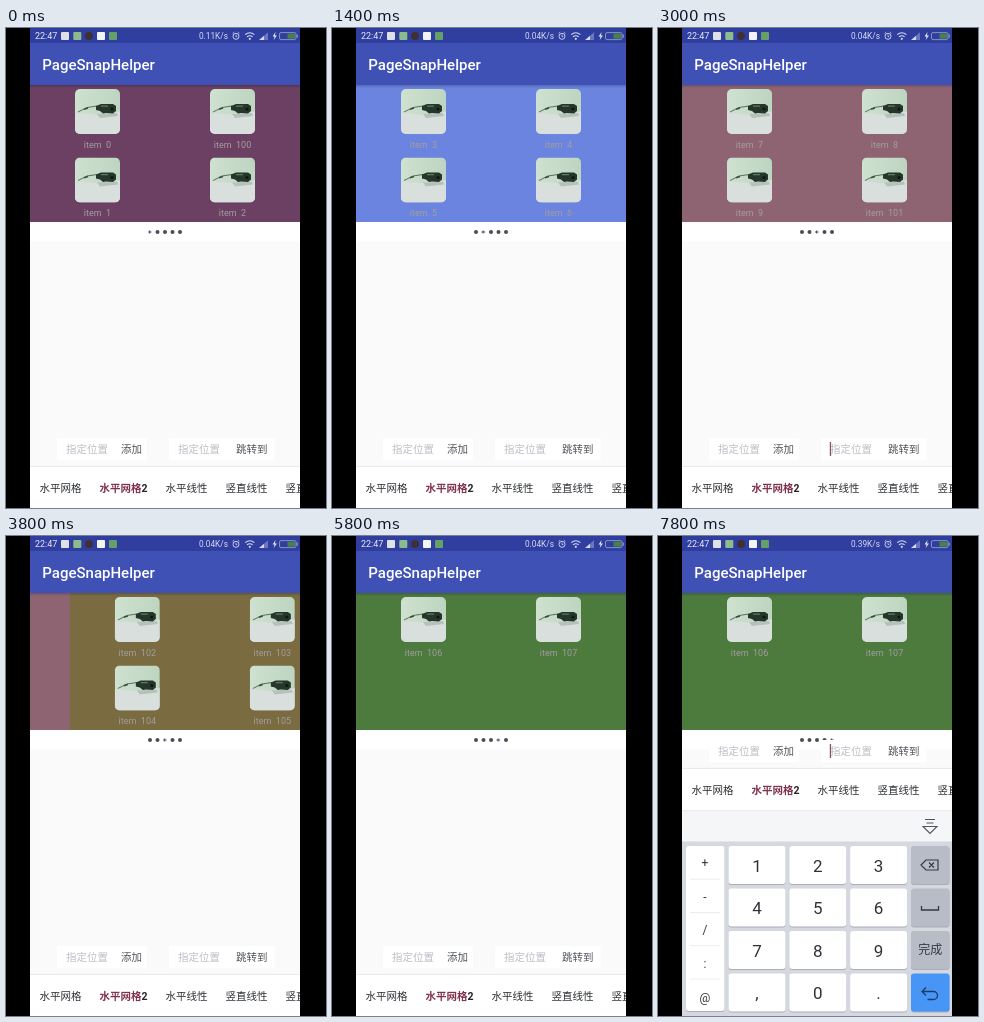
Write an HTML page that moves like this. It is 320x480 px and loops after 8000 ms.

```html
<!DOCTYPE html>
<html lang="zh">
<head>
<meta charset="utf-8">
<title>PageSnapHelper</title>
<style>
html, body { margin: 0; width: 100%; height: 100%; overflow: hidden; background: #000; }
svg { display: block; width: 100%; height: 100%; }
text { font-family: Roboto, "Noto Sans CJK SC", "Noto Sans CJK", sans-serif; white-space: pre; }
</style>
</head>
<body>
<svg id="stage" viewBox="0 0 320 480"></svg>
<script>
const LOOP = 8000, PAGE = 270, LEFT = 24;
const SWIPES = [199, 1688, 3185, 4660], SWIPE_TIME = 1000, IDLE_DELAY = 1150;
const KEYS_UP = 6700, KEYS_TIME = 300, PANEL_LIFT = 206;
const PAGES = [
  ['#6c4062', [0, 100, 1, 2]],
  ['#6b84df', [3, 4, 5, 6]],
  ['#8e6473', [7, 8, 9, 101]],
  ['#7a6b41', [102, 103, 104, 105]],
  ['#4d7a3d', [106, 107]]
];

const rect = (x, y, w, h, fill, r = 0, more = '') =>
  `<rect x="${x}" y="${y}" width="${w}" height="${h}" rx="${r}" fill="${fill}" ${more}/>`;
const text = (x, y, size, fill, str, more = '') =>
  `<text x="${x}" y="${y}" font-size="${size}" fill="${fill}" ${more}>${str}</text>`;
const mid = (x, y, size, fill, str) => text(x, y, size, fill, str, 'text-anchor="middle"');
const line = (d, stroke, w = 1, more = '') =>
  `<path d="${d}" fill="none" stroke="${stroke}" stroke-width="${w}" ${more}/>`;
const disc = (x, y, r, fill) => `<circle cx="${x}" cy="${y}" r="${r}" fill="${fill}"/>`;

function statusBar() {
  return rect(LEFT, 0, PAGE, 15, '#303f9f') +
    text(29, 11.3, 9, '#e8eaf6', '22:47') +
    rect(55, 4, 8, 8, '#dfe1e4', 1) +
    rect(67.3, 4, 8, 8, '#8dbb8c', 1) +
    disc(83, 8, 4, '#3f3034') +
    rect(91, 4, 8, 8, '#f2f4fa', 1) +
    rect(103, 4, 8, 8, '#65a067', 1) +
    text(222, 11, 8.3, '#d5daf0', '', 'id="speed" text-anchor="end"') +
    '<circle cx="230" cy="8.3" r="3" fill="none" stroke="#d5daf0" stroke-width=".9"/>' +
    line('M230 6.6v2h1.3M226.6 5.6l1.6-1.5M233.4 5.6l-1.6-1.5', '#d5daf0', .8) +
    line('M239.2 6.7q4.6-3.8 9.2 0M241 8.8q2.8-2.2 5.6 0', '#d5daf0', 1.1) +
    disc(243.8, 10.8, 1.1, '#d5daf0') +
    '<path d="M253 12l5-4.2V12z" fill="#d5daf0"/>' +
    '<path d="M258 12V7.8l4-3.5V12z" fill="#6a76bd"/>' +
    '<path d="M269.6 4l-3 4.4h2l-.9 3.6 3.2-4.6h-2z" fill="#e8eaf6"/>' +
    rect(273.5, 4.6, 16.5, 7, 'none', 1.5, 'stroke="#8f9cc0" stroke-width=".9"') +
    rect(281.5, 5.6, 7.5, 5, '#47804f') +
    rect(290.6, 6.6, 1.2, 3, '#8f9cc0');
}

function photo(x, y) {
  return `<g transform="translate(${x} ${y})" clip-path="url(#thumb)">` +
    rect(0, 0, 45, 45, 'url(#wall)') +
    '<path d="M0 24L20 25.5 45 22.5V45H0z" fill="#d9dfdd"/>' +
    '<path d="M22 25l20-1 1 3-18 2z" fill="#b3c2ba"/>' +
    line('M3 23L12 18.5 22 17', '#5b6e60', 1) +
    line('M9 20.2l4-1.2', '#3a4c41', 1.6) +
    '<path d="M21 17l5-2h12l3 2v5l-3 2.5-7-.5-3 .5-3-2.5-4-1z" fill="#26362b"/>' +
    line('M26 17.2h7', '#5d7a64', 1.2) + disc(37, 20, 1.6, '#101712') +
    '</g>';
}

function page([color, items], i) {
  const cells = items.map((n, k) => {
    const x = LEFT + i * PAGE + 67.5 + (k % 2) * 135, y = 61 + (k >> 1) * 68.5;
    return photo(x - 22.5, y) + mid(x, y + 58.7, 9, '#a39da0', 'item\u00a0\u00a0' + n);
  });
  return rect(LEFT + i * PAGE, 57, PAGE + .2, 137, color) + cells.join('');
}

function field(x, w, button, bx) {
  return rect(x, 410, w, 22.5, '#fff') +
    text(x + 9, 425.2, 10.5, '#bdbdc6', '指定位置') +
    text(bx, 425.2, 10.5, '#50545a', button);
}

function panel() {
  const tabs = ['水平网格', '', '水平线性', '竖直线性', '竖直网格'];
  const xs = [33.5, 93.5, 159.5, 219.5, 279.5];
  return field(51, 90, '添加', 115) + field(163, 105.5, '跳转到', 230) +
    rect(171.8, 414, 1.3, 14, '#85506a', 0, 'id="caret"') +
    rect(LEFT, 437.5, PAGE, 2, 'url(#edge)') +
    rect(LEFT, 439, PAGE, 41.5, '#fff') +
    tabs.map((s, i) => text(xs[i], 463.8, 10.5, '#2c2f33', s)).join('') +
    text(93.5, 463.8, 10.5, '#80344c', '水平网格<tspan fill="#2a2226">2</tspan>', 'font-weight="700"');
}

function keyboard() {
  const rows = [310, 352.5, 395, 437.5], digits = '123456789,0.';
  const key = (x, y, w, fill) => rect(x, y + 1, w, 38, '#a9aeb8', 3) + rect(x, y, w, 38, fill, 3);
  let s = rect(LEFT, 274.5, PAGE, 31.5, '#f5f6f8') + rect(LEFT, 274.5, PAGE, .6, '#dfe1e5') +
    rect(LEFT, 305.5, PAGE, 175, '#d5d8df') +
    line('M267 283.5h10M268.5 287h7M265 290.5h14l-7 7z', '#50555e', 1.1) +
    rect(28, 311, 38.5, 165, '#a9aeb8', 3) + rect(28, 310, 38.5, 165, '#fff', 3);
  [...'+-/:@'].forEach((c, i) => {
    s += mid(47, 331 + i * 33.7, 12, '#33373e', c);
    if (i) s += rect(32, 309.5 + i * 33.3, 30.5, .7, '#e4e6ea');
  });
  [...digits].forEach((c, i) => {
    const x = 70.5 + (i % 3) * 60.8, y = rows[Math.floor(i / 3)];
    s += key(x, y, 57, '#fff') + mid(x + 28.5, y + 25.7, 17, '#2e3238', c);
  });
  rows.forEach((y, i) => s += key(253, y, 38.5, i < 3 ? '#b7bcc6' : '#4795f7'));
  return s + line('M263 329l5-5h12v10h-12zM271 326.5l5 5m0-5l-5 5', '#343941', 1.2) +
    line('M263.5 370v4h17v-4', '#343941', 1.3) +
    mid(272.2, 418.3, 12, '#343941', '完成') +
    line('M268 451.5l-4 4 4 4M264.5 455.5h11a4 4 0 0 1 0 8h-6', '#213a63', 1.3);
}

const dots = PAGES.map((_, i) => disc(144 + i * 7.5, 204, 2, '#48504f')).join('');

document.getElementById('stage').innerHTML = `
<defs>
  <clipPath id="screen"><rect x="24" width="270" height="480"/></clipPath>
  <clipPath id="thumb"><rect width="45" height="45" rx="5"/></clipPath>
  <linearGradient id="wall"><stop stop-color="#cfe1d0"/><stop offset="1" stop-color="#bdd5c0"/></linearGradient>
  <linearGradient id="shade" x2="0" y2="1"><stop stop-opacity=".2"/><stop offset="1" stop-opacity="0"/></linearGradient>
  <linearGradient id="edge" x2="0" y2="1"><stop stop-color="#f6f6f6"/><stop offset="1" stop-color="#dedede"/></linearGradient>
</defs>
${rect(0, 0, 320, 480, '#000')}
<g clip-path="url(#screen)">
  ${rect(LEFT, 0, PAGE, 480, '#fafafa')}
  <g id="pager">${PAGES.map(page).join('')}</g>
  ${rect(LEFT, 57, PAGE, 3, 'url(#shade)')}
  ${rect(LEFT, 15, PAGE, 42, '#3f51b5')}
  ${text(36.3, 42, 15, '#fff', 'PageSnapHelper', 'font-weight="500"')}
  ${statusBar()}
  ${rect(LEFT, 194, PAGE, 19.5, '#fff')}
  ${dots}
  <g id="active">${rect(-2.4, -2.4, 4.8, 4.8, '#fff')}${disc(.2, 0, 1.7, '#d9d5ea')}${line('M-2 0h3.4M-.5-1.4v2.8', '#4d4a66', .9)}</g>
  <g id="panel">${panel()}</g>
  <g id="keys">${keyboard()}</g>
</g>`;

const [pager, active, bottom, keys, caret, speed] =
  ['pager', 'active', 'panel', 'keys', 'caret', 'speed'].map(id => document.getElementById(id));
const clamp = v => Math.min(1, Math.max(0, v));
const easeOut = u => 1 - (1 - u) ** 2;
const move = (el, x, y) => el.setAttribute('transform', `translate(${x} ${y})`);

function draw(t) {
  const scroll = SWIPES.reduce((sum, s) => sum + easeOut(clamp((t - s) / SWIPE_TIME)), 0);
  const index = SWIPES.filter(s => t >= s + IDLE_DELAY).length;
  const shown = easeOut(clamp((t - KEYS_UP) / KEYS_TIME));
  const blink = t % 1200;
  move(pager, -scroll * PAGE, 0);
  move(active, 144 + index * 7.5, 204);
  move(keys, 0, (1 - shown) * 206);
  move(bottom, 0, shown === 1 ? -PANEL_LIFT : 0);
  caret.setAttribute('opacity', blink >= 500 && blink < 1000 ? 1 : 0);
  speed.textContent = (t < 400 ? '0.11' : t < 6200 ? '0.04' : '0.39') + 'K/s';
}

const start = performance.now();
function tick() {
  draw((performance.now() - start) % LOOP);
  requestAnimationFrame(tick);
}
tick();
</script>
</body>
</html>
```
